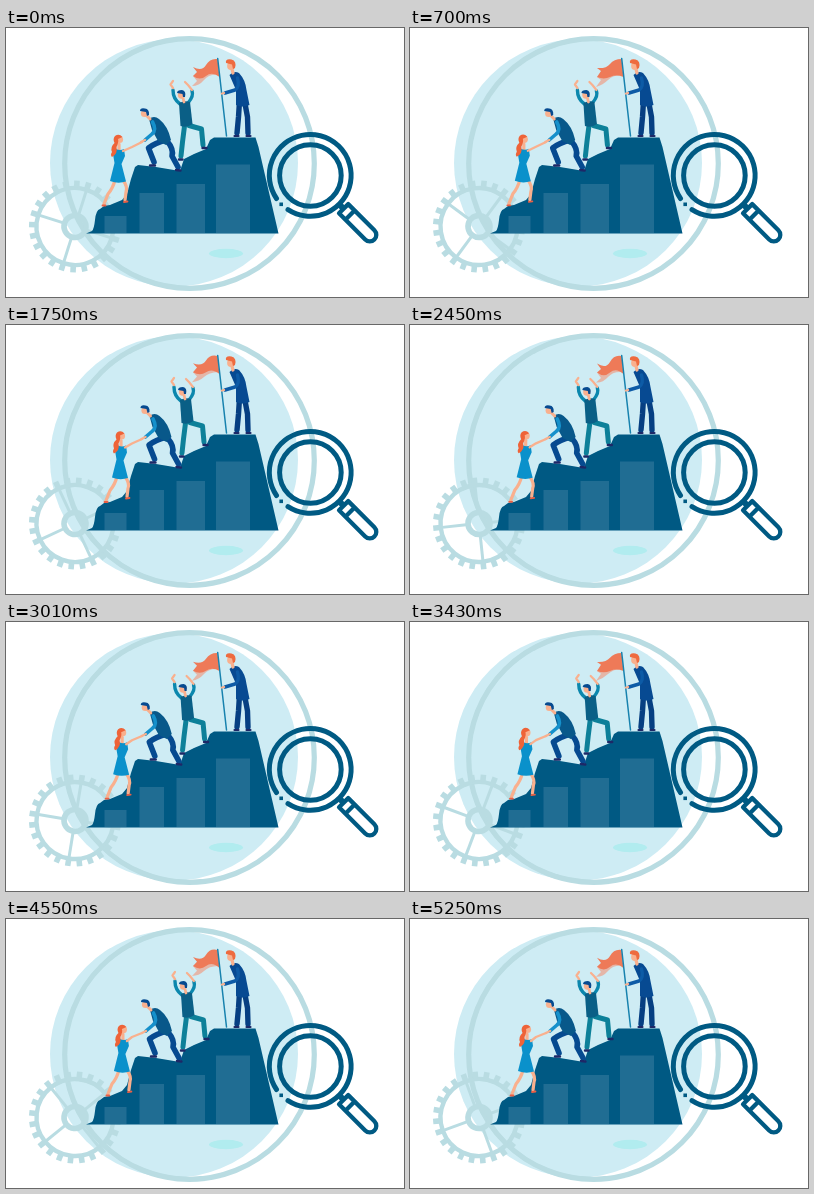
An HTML page for the animation above (5320 ms loop, 398 by 269 pixels).

```html
<!DOCTYPE html>
<html lang="en">
<head>
<meta charset="utf-8">
<title>Team climbing a growth chart</title>
<style>
html, body { margin: 0; width: 100%; height: 100%; overflow: hidden; background: #fff; }
svg { display: block; width: 100vw; height: 100vh; }
.line { fill: none; stroke-linecap: round; stroke-linejoin: round; }
</style>
</head>
<body>
<svg viewBox="0 0 398 269">
  <ellipse cx="168" cy="135" rx="124" ry="123.500" fill="#ceecf4"/>
  <circle cx="183.500" cy="135.500" r="124.800" fill="none" stroke="#b9dce2" stroke-width="5.200"/>
  <ellipse cx="220" cy="225.500" rx="17" ry="4.700" fill="#b1ecef"/>

  <g id="gear" fill="none" stroke="#b9dce2">
    <circle r="38.500" stroke-width="4.400"/>
    <circle r="11" stroke-width="5.600"/>
    <g id="teeth" stroke-width="5.600"/>
    <g id="spokes" stroke-width="3"/>
  </g>

  <path fill="#005983" d="M80 205.400 86 203Q88 201 89 192 90 182 94 181L98 178 104 177 116 172 121 166 125 151 129 139 132 137 150 139 168 142 174 143 178 131 188 126 200 121 204 112 208 109.500H249.500L252.500 119 272.500 205.400Z"/>
  <path fill="#206d93" d="M98.500 188h22v17h-22zM133.500 165h24.500v40h-24.500zM170.500 156h28.500v49h-28.500zM210 136.500h34v68.500h-34z"/>

  <g class="line" stroke="#005a83" stroke-width="5" transform="translate(304.400 147.500)">
    <circle r="30.800"/>
    <path d="M-22.400 34.200A40.900 40.900 0 1 0-33.900 23"/>
    <path fill="#005a83" stroke="none" d="M-31 27h3.600v3.600h-3.600z"/>
    <g transform="rotate(45)" stroke-width="4.300">
      <path d="M42 0H46" stroke-width="6" stroke-linecap="butt"/>
      <path d="M47-6.500H84a6.500 6.500 0 0 1 0 13H47ZM56-6.500v13"/>
    </g>
  </g>

  <g id="woman">
    <g class="line" stroke="#f9b08e" stroke-width="3.200">
      <path d="M109 152Q107 160 102 166L98 176"/>
      <path d="M117 152Q122 159 120 164L119 172"/>
      <path d="M113 116v7"/>
    </g>
    <path class="line" stroke="#e95f45" stroke-width="1.800" d="M96.500 177.500h3M118 174l3.500-.5"/>
    <path fill="#0a91cb" d="M110 121Q114 123 118 121L119 128 115.500 136 120 153.500Q112 156 104 153L108.500 135 107 126Z"/>
    <circle cx="113.500" cy="111.500" r="3.600" fill="#f9b08e"/>
    <path fill="#ee6338" d="M116.500 109Q113 105 109 108 106.500 111 108.500 115 104 119 106 124 104 127 106 129 112 126 110.500 119 113 114 112 111Z"/>
  </g>
  <path id="reach" class="line" stroke="#f9b08e" stroke-width="2.300"/>

  <g id="puller">
    <g class="line" stroke="#064a90" stroke-width="5.600">
      <path d="M160 112Q149 115 142.500 120L148 134"/>
      <path d="M161 113Q168 121 166 128L172 139"/>
    </g>
    <path class="line" stroke="#1d2867" stroke-width="2.400" d="M144 137.500h5M170 142l4.500 .5"/>
    <path fill="#08588a" d="M143 91Q148 87 153 91 162 98 165 112L160 117 152 113 146 102Z"/>
    <path class="line" stroke="#1590cb" stroke-width="3.600" d="M146.500 94Q151 102 146 106L139 112"/>
    <path class="line" stroke="#f9b08e" stroke-width="2.300" d="M139 112l-4 2"/>
    <path class="line" stroke="#f9b08e" stroke-width="3" d="M140 87l4 4"/>
    <circle cx="138.500" cy="85.500" r="3.600" fill="#f9b08e"/>
    <path fill="#064a90" d="M134 83Q134 79.500 139 80.500 143.500 81 143 87L141 88 140 84Z"/>
  </g>

  <g id="cheerer">
    <g class="line" stroke="#0d8099" stroke-width="5">
      <path d="M178.500 98 176.500 114 175 128"/>
      <path d="M183 97.500 195.500 101 197 117"/>
    </g>
    <path class="line" stroke="#1d2867" stroke-width="2.400" d="M173 131.500h3.500M196.500 120h4"/>
    <g class="line">
      <path stroke="#0b87ad" stroke-width="3.400" d="M174 76Q167 71 167 62M182 75Q188 68 186 63"/>
      <path stroke="#f9b08e" stroke-width="2.200" d="M167 60 164.500 56.500 167 53M186 62 182 57 179 54"/>
    </g>
    <path fill="#0a5f86" d="M173 75Q179 72 184 74L186.500 96Q181 100 174.500 98Z"/>
    <circle cx="175.500" cy="67" r="3.700" fill="#f9b08e"/>
    <path class="line" stroke="#f9b08e" stroke-width="2.800" d="M177 70l1 4"/>
    <path fill="#064a90" d="M171 65Q171 62 176 62 180.500 63 179 69L177 69 176.500 66Z"/>
  </g>

  <path id="tail" fill="#f0997f" opacity=".65"/>
  <path id="flag" fill="#ee7a58"/>
  <path class="line" stroke="#1782ae" stroke-width="1.500" d="M211.700 30.500 220.500 108"/>
  <g id="leader">
    <g class="line" stroke="#063f82" stroke-width="5.400">
      <path d="M233.500 73 232.500 89 231 105"/>
      <path d="M238.500 73 241.500 89 242 105"/>
    </g>
    <path class="line" stroke="#1d2867" stroke-width="2.200" d="M228.500 108h4M240.500 108h4"/>
    <path fill="#074a92" d="M223.500 47Q228 42 233 45 239.500 52 240.500 62L243.500 77Q236 80 230 77L230 62Z"/>
    <path class="line" stroke="#0d5ba6" stroke-width="3.400" d="M231.500 50Q234 59 229 62L219 65"/>
    <path class="line" stroke="#f9b08e" stroke-width="2.300" d="M218 65l-2 .5"/>
    <circle cx="225" cy="38" r="3.900" fill="#f9b08e"/>
    <path class="line" stroke="#f9b08e" stroke-width="3.200" d="M226 41l1 4"/>
    <path fill="#ee6b3f" d="M220 35Q219 30.500 225.500 31.500 231 33 229 40L227 41 226 36.500Z"/>
  </g>
</svg>
<script>
const STEP = 70, STEPS = 76, TEETH = 24, SPOKES = 4;
const START = 107.5, TURN = 1.9;
const $ = id => document.getElementById(id);
const move = (id, x, y = 0) => $(id).setAttribute("transform", `translate(${x} ${y})`);

function radial(id, count, from, to) {
  for (let i = 0; i < count; i++) {
    const bar = document.createElementNS("http://www.w3.org/2000/svg", "path");
    bar.setAttribute("d", `M${from} 0H${to}`);
    bar.setAttribute("transform", `rotate(${i * 360 / count})`);
    $(id).append(bar);
  }
}
radial("teeth", TEETH, 39, 46);
radial("spokes", SPOKES, 13, 37);

function drawFlag(phase) {
  const a = Math.sin(phase), b = Math.cos(phase);
  $("flag").setAttribute("d",
    `M211.500 31Q204 ${30 + a} 200 ${36 + b}T187 ${39 + a}L191 ${43 + b} 187 ${48 + a}` +
    `Q194 ${52 + b} 200 ${48 + a}T213.500 49Z`);
  $("tail").setAttribute("d",
    `M205 36Q197 ${47 + b} 187 ${48 + a}L191 ${52 + b} 186 ${58 + a}Q193 ${57 + b} 198 52T212 47Z`);
}

function draw() {
  const n = Math.floor(performance.now() / STEP) % STEPS;
  const pull = Math.sin(n / (STEPS - 1) * Math.PI / 2);
  const dx = 4 * pull, dy = -pull;
  $("gear").setAttribute("transform", `translate(69 198.500) rotate(${START + TURN * n})`);
  move("woman", dx, dy);
  $("reach").setAttribute("d", `M${117 + dx} ${123 + dy}L126 ${119 + dy} 136 114`);
  move("puller", pull);
  move("cheerer", 2 * pull);
  drawFlag(n / STEPS * Math.PI * 4);
  requestAnimationFrame(draw);
}
draw();
</script>
</body>
</html>
```
